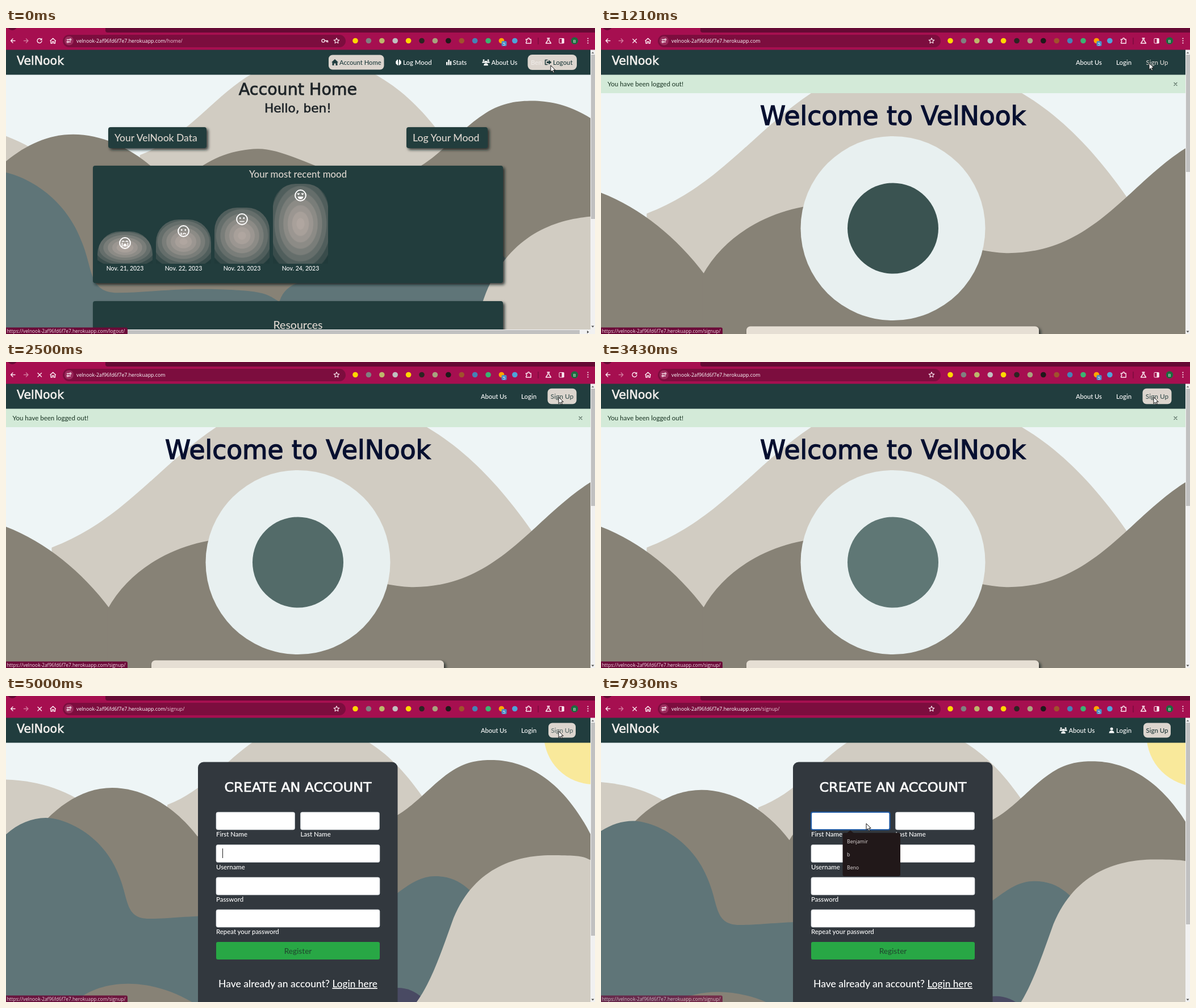
Animation of 1037 by 540 pixels, one loop 8 s. Source, as an HTML page:

```html
<!DOCTYPE html>
<html lang="en">
<head>
<meta charset="utf-8">
<title>VelNook</title>
<style>
html, body { margin: 0; width: 100%; height: 100%; overflow: hidden; background: #eef5f6; }
svg { display: block; width: 1037px; height: 540px; }
text { font-family: Lato, sans-serif; font-weight: 500; white-space: pre; }
.head { font-family: "DejaVu Sans", sans-serif; font-weight: 400; stroke: currentColor; stroke-width: .03em; }
.ui { font-family: "Open Sans", "Noto Sans", sans-serif; font-weight: 400; }
.line { fill: none; stroke: currentColor; stroke-linecap: round; stroke-linejoin: round; }
</style>
</head>
<body>
<svg id="stage" viewBox="0 0 1037 540"></svg>
<script>
const LOOP = 8000;
const TEAL = '#213d3e', PALE = '#dcd5ce', INK = '#1f2529';
const HOST = 'velnook-2af96fd6f7e7.herokuapp.com';

const clamp = p => Math.max(0, Math.min(1, p));
const ramp = (t, a, b) => clamp((t - a) / (b - a));
const smooth = p => p * p * (3 - 2 * p);
const mix = (a, b, p) => `rgb(${a.map((v, i) => Math.round(v + (b[i] - v) * p))})`;

const rect = (x, y, w, h, fill, r = 0, more = '') =>
  `<rect x="${x}" y="${y}" width="${w}" height="${h}" rx="${r}" fill="${fill}" ${more}/>`;
const disc = (x, y, r, fill, more = '') =>
  `<circle cx="${x}" cy="${y}" r="${r}" fill="${fill}" ${more}/>`;
const path = (d, fill, more = '') => `<path d="${d}" fill="${fill}" ${more}/>`;
const line = (d, color, w = 1.4) =>
  `<path class="line" d="${d}" color="${color}" stroke-width="${w}"/>`;
const text = (x, y, size, str, fill, more = '') =>
  `<text x="${x}" y="${y}" font-size="${size}" fill="${fill}" ${more}>${str}</text>`;
const mid = 'text-anchor="middle"';
const head = (x, y, size, str, color, more = mid) =>
  text(x, y, size, str, color, `class="head" color="${color}" ${more}`);
const group = (id, body) => `<g id="${id}">${body}</g>`;
const at = (x, y, body) => `<g transform="translate(${x} ${y})">${body}</g>`;
const shade = 'filter="url(#shade)"';

function landscape() {
  const sand = '#d1ccc2', taupe = '#878276', sage = '#5f7578';
  const hill = (d, fill) => path(d + 'V700H' + d.match(/-?\d+/)[0] + 'Z', fill);
  return disc(1035, 68, 88, '#f9e99b') +
    hill('M-40 148C40 144 100 158 160 205', sand) +
    hill('M284 192C350 167 384 115 438 79C490 46 585 46 634 79C671 101 702 133 732 176', sand) +
    hill('M40 255C80 200 130 162 187 162S300 198 338 249', taupe) +
    hill('M336 250C360 206 410 184 455 183S565 228 620 229C700 230 733 165 787 131C812 115 835 113 855 113C905 113 980 138 1036 258', taupe) +
    hill('M-20 266C5 233 38 215 70 215S172 243 200 320C216 360 210 393 252 393S330 386 400 388S470 396 490 408', sage) +
    hill('M486 410C496 362 560 372 640 372C680 368 708 318 755 318S820 346 850 380', sage) +
    path('M110 552C150 500 250 488 340 548Z', taupe) +
    disc(690, 576, 61, '#494a63') +
    hill('M700 566C740 530 760 470 785 400C820 305 895 281 960 281S1015 285 1036 292', sand);
}

const userIcon = (x, y, s) => at(x, y, `<g transform="scale(${s})">` +
  disc(0, -2.6, 2.5, '#fff') + path('M-4.5 5q0 -4.600 4.500 -4.600t4.500 4.600z', '#fff') + '</g>');
const crowd = x => userIcon(x - 4, 58.5, .62) + userIcon(x + 4, 58.5, .62) + userIcon(x, 62, .85);

function face(x, y, mood) {
  const eyes = disc(-3.3, -2, 1.4, '#fff') + disc(3.3, -2, 1.4, '#fff');
  const heart = 'c-1.5 -2 -3.5 0 0 3c3.5 -3 1.5 -5 0 -3z';
  const looks = [
    line('M-5 -2.5q1.8 -1.6 3.4 0M1.6 -2.5q1.6 -1.6 3.4 0M-5 0v6M5 0v6', '#fff', 1.6) +
      path('M-3 6q0 -5 3 -5t3 5z', '#fff'),
    eyes + line('M-1 5q2.5 -2.5 5 0', '#fff', 1.7) + path('M-4 2q-2.6 4 0 4.600t0 -4.600z', '#fff'),
    eyes + line('M-3.5 4H3.5', '#fff', 1.7),
    path(`M-3.6 -3.4${heart}M3.6 -3.4${heart}M-5 2H5Q4 6.6 0 6.600T-5 2z`, '#fff')
  ];
  return at(x, y, disc(0, 0, 9.4, 'none', 'stroke="#fff" stroke-width="2"') + looks[mood]);
}

// One bar per day; a better mood makes a taller bar
function bar(height, i) {
  const x = 161 + i * 103, w = 97, r = 40, top = 416 - height;
  return path(`M${x} 416V${top + r}a${r} ${r} 0 0 1 ${r} ${-r}h${w - 2 * r}a${r} ${r} 0 0 1 ${r} ${r}V416z`, 'url(#glow)') +
    face(x + w / 2, top + 20.5, i) +
    text(x + w / 2, 427.5, 10.5, `Nov. ${21 + i}, 2023`, '#fff', mid);
}

function homePage() {
  return head(514, 118, 28.5, 'Account Home', INK) + head(514, 149, 21.6, 'Hello, ben!', INK) +
    rect(180, 175, 173, 37, TEAL, 4, shade) + text(191, 200, 17.5, 'Your VelNook Data', PALE) +
    rect(705, 175, 143, 37, TEAL, 4, shade) + text(716, 200, 17.7, 'Log Your Mood', PALE) +
    rect(153, 243, 722, 207, TEAL, 4, shade) +
    text(514, 264, 16.8, 'Your most recent mood', PALE, mid) +
    [57, 78, 99, 141].map(bar).join('') +
    rect(153, 482, 722, 90, TEAL, 4, shade) +
    text(514, 531, 19.5, 'Resources', PALE, mid) +
    rect(0, 532, 1037, 8, '#f1f1f1') + rect(8, 533, 1002, 7, '#c1c1c1') +
    path('M1023 534l3.5 2.5l-3.5 2.5z', '#505050');
}

function welcomePage() {
  return rect(0, 82, 1029, 33, '#d3ead8') +
    text(11.5, 103, 11.5, 'You have been logged out!', '#25402f') +
    line('M1009 96.5l5 5m0 -5l-5 5', '#60776a', 1.3) +
    head(514, 170.5, 45.6, 'Welcome to VelNook', '#071030') +
    disc(514, 353.5, 162.5, '#e8f0f0') + disc(514, 353.5, 80, TEAL, 'id="badge"') +
    rect(256, 526.5, 515, 40, '#e6dfd4', 7, shade);
}

const field = (x, y, w, label, ring) =>
  rect(x, y, w, 31, '#fff', 3, 'stroke="#ced4da" stroke-width=".7"') +
  (ring ? rect(x, y, w, 31, 'none', 3, `id="${ring}" stroke="#1f58a0" stroke-width="2.2"`) : '') +
  text(x, y + 43, 11.4, label, '#fff');

function signupPage() {
  const suggestions = ['Benjamir', 'b', 'Beno'].map((s, i) =>
    text(433, 259.5 + i * 23.4, 8.7, s, '#e4dddd', 'class="ui"'));
  return rect(338, 116.5, 351.5, 450, '#32383e', 10) +
    head(514, 168.5, 23.8, 'CREATE AN ACCOUNT', '#fff') +
    field(370, 205, 138.5, 'First Name', 'ringFirst') + field(518.5, 205, 139, 'Last Name') +
    field(370, 262.5, 288, 'Username', 'ringUser') + field(370, 320, 288, 'Password') +
    field(370, 377, 288, 'Repeat your password') +
    rect(370, 434, 288, 31, '#28a745', 3) + text(514, 454.5, 13.6, 'Register', '#214a30', mid) +
    text(374, 514, 17.5, 'Have already an account?', '#fff') +
    text(574.5, 514, 17.3, 'Login here', '#fff', 'text-decoration="underline"') +
    rect(381, 269, 1, 17, '#222', 0, 'id="caret"') +
    group('popup', path('M433 242l6 -5l6 5z', '#211819') +
      rect(425.5, 241.5, 101.5, 76.5, '#211819', 3) + suggestions.join(''));
}

function navHome() {
  const lobe = 'q-2 0 -2.3 2q-2 1 -1.4 3.3q-.6 2.5 1.6 3.4q.6 1.8 2.6 1.500z';
  const stats = [5.5, 9.5, 7].map((h, i) => rect(775 + i * 3.4, 65.5 - h, 2.4, h, '#fff'));
  return rect(568, 47.5, 97.5, 26, PALE, 7) +
    path('M573 60.5L579 55l6 5.5h-1.5V66h-3v-3.5h-3V66h-3v-5.5z', TEAL) +
    text(587, 64.5, 11.2, 'Account Home', TEAL) +
    path('M690 55.5' + lobe, '#fff') + path('M-692 55.5' + lobe, '#fff', 'transform="scale(-1 1)"') +
    text(699, 64.5, 11.4, 'Log Mood', '#fff') +
    stats.join('') + text(786.5, 64.5, 11.4, 'Stats', '#fff') +
    crowd(845) + text(854.5, 64.5, 11.1, 'About Us', '#fff') +
    rect(918.5, 47, 86.5, 27, PALE, 8, 'id="outPill"') + text(924, 64.5, 11.4, 'Ben', '#eeeae6') +
    group('outLabel', line('M953 56.5h-3.5v8h3.5', 'inherit', 1.6) +
      path('M952 59h3.5v-2.8l5 4.3l-5 4.3V62H952z', 'currentColor') +
      text(963, 64.5, 11.3, 'Logout', 'currentColor'));
}

function navGuest() {
  return group('guestIcons', crowd(814) + userIcon(899, 60.5, 1)) +
    text(0, 64.5, 11.1, 'About Us', '#fff', 'id="about"') + text(907, 64.5, 11.4, 'Login', '#fff') +
    rect(0, 0, 0, 0, PALE, 7, 'id="signPill"') +
    text(979, 64.5, 11.5, 'Sign Up', '#fff', `id="signLabel" ${mid}`);
}

function chrome() {
  const w = '#fbeaf1', dark = '#650a34';
  const ring = (x, y, r) => disc(x, y, r, 'none', `stroke="${w}" stroke-width="1.2"`);
  const star = Array.from({ length: 10 }, (_, i) => {
    const r = i % 2 ? 2.3 : 5, a = (i / 5 - .5) * Math.PI;
    return [582 + r * Math.cos(a), 22.8 + r * Math.sin(a)].map(v => v.toFixed(1));
  });
  const extensions = 'gold gray darkkhaki silver gold #2b2422 #a8a27e #1e1a1a sienna steelblue mediumseagreen orange #4fa3d8'
    .split(' ').map((c, i) => disc(615 + 23.4 * i, 22.5, 4.8, c));
  return rect(0, 0, 1037, 38.5, '#a60f50') + rect(175, -6, 870, 14, dark, 4) + disc(11, -5, 9, dark) +
    line('M16 22.5H8.5m3.5 -3.5l-3.5 3.5l3.5 3.5', w) +
    line('M31.5 22.5H39m-3.5 -3.5l3.5 3.5l-3.5 3.5', '#d27a9d') +
    group('reload', line('M62.2 20a4 4 0 1 0 .8 3', w) + path('M63.5 17.5v4h-4z', w)) +
    group('stop', line('M56 19.5l6.5 6.5m0 -6.5l-6.5 6.5', w)) +
    line('M79 22v5h2.5v-3h2.5v3h2.5v-5M78 22.5l4.7 -4.2l4.7 4.2', w) +
    rect(100, 12, 498, 22, '#7c0d3e', 11) + disc(111, 22.5, 8, '#9b2b5c') +
    line('M107.5 20.5h3.5m2.5 4h-3', w) + ring(113.3, 20.5, 1.3) + ring(108.6, 24.5, 1.3) +
    text(124, 26, 8.8, `${HOST}<tspan id="route" fill="#ecc8d6"></tspan>`, '#fff', 'class="ui"') +
    group('key', ring(558.5, 22.5, 2.6) + line('M561.5 22.5h5v2.5m-2 -2.5v2', w)) +
    line(`M${star.join('L')}Z`, w, 1.1) + extensions.join('') +
    rect(872.5, 23, 9, 9, '#4b8fc6', 2) + text(877, 30.5, 7.5, '5', '#fff', `class="ui" ${mid}`) +
    line('M915.5 20h3a1.6 2.4 0 0 1 3.200 0h2.500v7h-8.500v-2a1.800 1.800 0 0 0 0 -3.400z', w) +
    rect(936.5, 17, 1, 12, dark) +
    line('M953 18h4m-3 0v3.5l-3.5 5.5h9l-3.5 -5.5V18', w) +
    rect(974, 18.5, 8, 8.5, 'none', 1, `stroke="${w}"`) + rect(978.5, 18.5, 4, 8.5, w) +
    disc(1001, 22.5, 6.3, '#1d6b3f') + text(1001, 25.5, 7.5, 'B', '#fff', `class="ui" ${mid}`) +
    [-4, 0, 4].map(d => disc(1024.5, 22.5 + d, 1.1, w)).join('');
}

// Mood bar glow: stepped rings that darken outwards
function rings(n) {
  return Array.from({ length: n }, (_, i) => {
    const c = mix([176, 166, 160], [32, 58, 58], (i / (n - 1)) ** 1.4);
    return [i, i + .8].map(o => `<stop offset="${o / n}" stop-color="${c}"/>`).join('');
  }).join('');
}

const stage = document.getElementById('stage');
stage.innerHTML = `<defs><radialGradient id="glow" r=".72">${rings(9)}</radialGradient>
  <filter id="shade" x="-10%" y="-10%" width="120%" height="140%">
    <feDropShadow dx="3" dy="3" stdDeviation="2.5" flood-color="#10121f" flood-opacity=".8"/></filter>
  <clipPath id="view">${rect(0, 38, 1029, 502, '#fff')}</clipPath></defs>` +
  rect(0, 0, 1037, 540, '#eef5f6') +
  `<g clip-path="url(#view)">${group('scene', landscape())}` +
  group('welcome', welcomePage()) + group('signup', signupPage()) + '</g>' +
  group('home', homePage()) +
  rect(0, 38, 1029, 44.5, TEAL) + head(19, 64.5, 20.5, 'VelNook', '#f4f1ee', '') +
  group('navHome', navHome()) + group('navGuest', navGuest()) +
  rect(1029, 38, 8, 502, '#f1f1f1') + rect(1030, 47, 7, 290, '#c1c1c1', 0, 'id="thumb"') +
  path('M1030.5 45l2.5 -3l2.5 3z', '#777') + path('M-2.5 -1.5h5l-2.5 3z', '#505050', 'id="down"') +
  chrome() +
  group('status', path('M0 528.5H211q3 0 3 3V540H0z', '#6b0a38') +
    text(1.5, 537.5, 8.35, '', '#f3dce6', 'class="ui" id="hint"')) +
  path('M0 0V11.5L2.7 9L4.6 13.2L6.5 12.4L4.6 8.3H8.2Z', '#fff', 'id="pointer" stroke="#111"');

const $ = {};
stage.querySelectorAll('[id]').forEach(e => $[e.id] = e);
const set = (id, attrs) => { for (const k in attrs) $[id].setAttribute(k, attrs[k]); };
const show = (id, on) => set(id, { display: on ? 'inline' : 'none' });
const label = (id, s) => { if ($[id].textContent !== s) $[id].textContent = s; };

// Pointer strokes: begin, end, dx, dy
const strokes = [[70, 210, 6, -4], [1300, 1550, 8, 0], [5250, 6070, -486.5, 210.5],
  [6300, 6640, -18.5, -42.5], [6930, 7070, -1, -5]];

function pointer(t) {
  let x = 959, y = 66;
  for (const [a, b, dx, dy] of strokes) {
    const p = smooth(ramp(t, a, b));
    x += dx * p;
    y += dy * p;
  }
  set('pointer', { transform: `translate(${x} ${y})` });
}

function view(t, home, signup, icons) {
  const [zoom, thumb] = home ? [1.21, 290]
    : signup ? (icons ? [1.031, 356] : [1, 376])
    : (icons ? [1.919, 201] : [1.885, 207]);
  set('scene', { transform: `translate(514 39) scale(${zoom}) translate(-514 -39)` });
  set('thumb', { height: thumb });
  set('down', { transform: `translate(1033 ${home ? 527 : 536})` });
  set('badge', { fill: mix([58, 83, 81], [114, 137, 135], ramp(t, 1210, 5000) ** .75) });
}

function nav(t, signup, icons) {
  const left = ramp(t, 780, 870);
  set('outPill', { opacity: 1 - left });
  set('outLabel', { color: mix([33, 61, 62], [255, 255, 255], left) });
  show('guestIcons', icons);
  set('about', { x: icons ? 823.5 : 836 });
  const hover = signup ? 0 : ramp(t, 1210, 1500);
  const w = 48 + 3 * hover, h = 26 + 1.5 * hover;
  set('signPill', { x: 979 - w / 2, y: 60.5 - h / 2, width: w, height: h, opacity: signup ? 1 : hover });
  set('signLabel', { 'font-size': 11.5 + .4 * hover, fill: signup
    ? mix([92, 110, 108], [33, 57, 58], ramp(t, 5000, 5400))
    : mix([216, 213, 208], [62, 84, 83], ramp(t, 1210, 1700)) });
}

function browser(t, home) {
  const idle = t < 640 || (t >= 3430 && t < 4360);
  show('reload', idle);
  show('stop', !idle);
  show('key', t < 790);
  label('route', t < 790 ? '/home/' : t < 4790 ? '' : '/signup/');
  label('hint', home && t >= 430 ? `Waiting for ${HOST}...` : `https://${HOST}/${home ? 'logout' : 'signup'}/`);
  set('status', { opacity: 1 - .3 * ramp(t, 4860, 5300) });
}

function form(t) {
  const first = t >= 7360, swap = ramp(t, 7340, 7430);
  set('ringUser', { opacity: ramp(t, 5000, 5150) * (1 - swap) });
  set('ringFirst', { opacity: swap });
  set('caret', { y: first ? 212 : 269 });
  show('caret', first ? t < 7930 : t < 6140 || t >= 6710);
  show('popup', t >= 7430);
}

function render(t) {
  const home = t < 1210, signup = t >= 5000;
  const icons = t >= (signup ? 5600 : 4290);
  show('home', home);
  show('navHome', home);
  show('navGuest', !home);
  show('welcome', !home && !signup);
  show('signup', signup);
  view(t, home, signup, icons);
  nav(t, signup, icons);
  browser(t, home);
  form(t);
  pointer(t);
}

let start;
function tick(now) {
  start ??= now;
  render((now - start) % LOOP);
  requestAnimationFrame(tick);
}
render(0);
requestAnimationFrame(tick);
</script>
</body>
</html>
```
